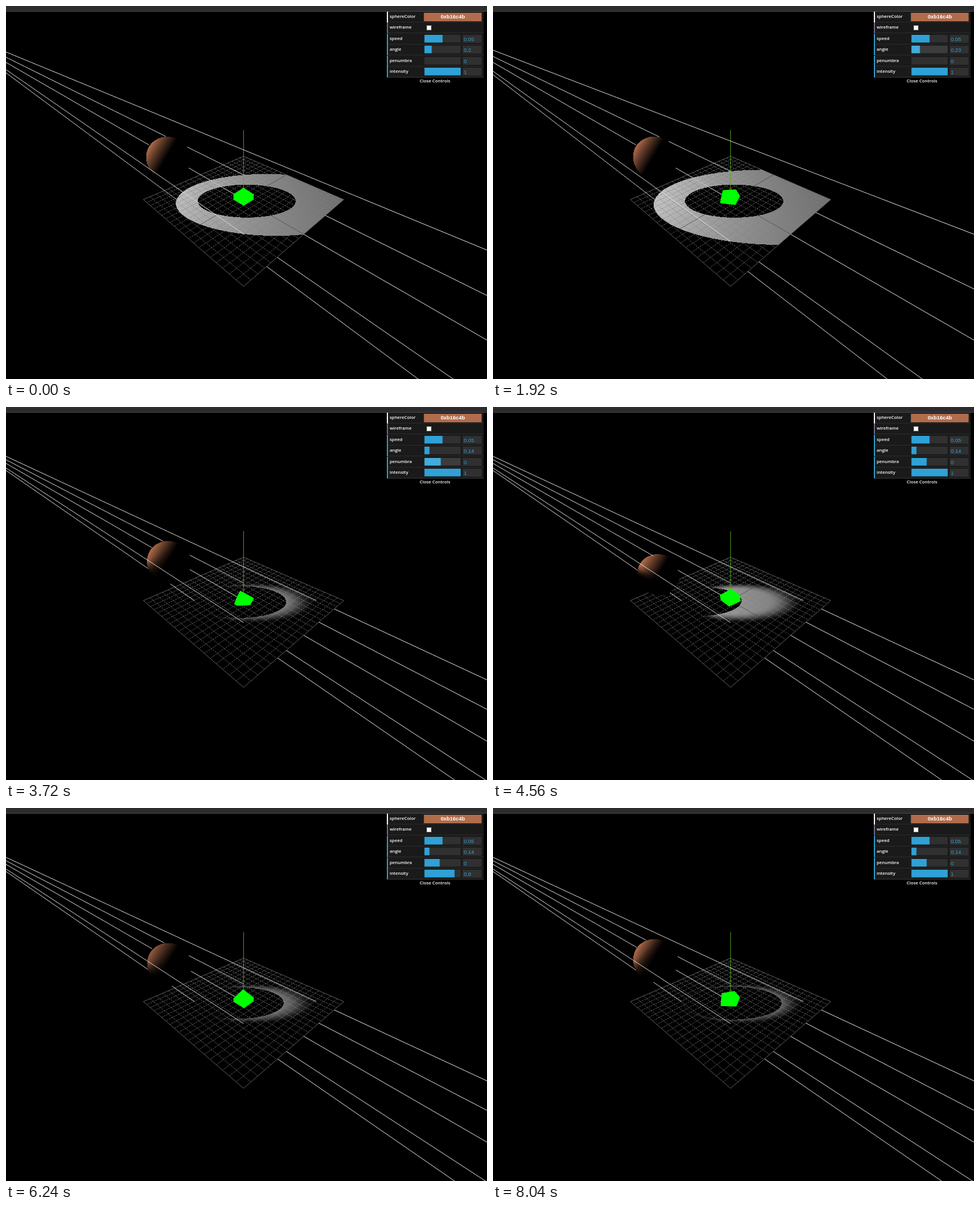
Recreate the animation shown at these times as an HTML page with a canvas. Size 850 px wide and 659 px high, loop 8.1 s.

```html
<!DOCTYPE html>
<html lang="en">
<head>
<meta charset="utf-8">
<title>Spotlight scene</title>
<style>
html, body { margin: 0; width: 100%; height: 100%; overflow: hidden; background: #000; }
canvas { display: block; }
</style>
</head>
<body>
<canvas id="stage" width="850" height="659"></canvas>
<script>
const ctx = document.getElementById('stage').getContext('2d');
const LOOP = 8100, TICK = 60;

// Vectors
const add = (a, b, k = 1) => [a[0] + b[0] * k, a[1] + b[1] * k, a[2] + b[2] * k];
const dot = (a, b) => a[0] * b[0] + a[1] * b[1] + a[2] * b[2];
const unit = a => add([0, 0, 0], a, 1 / Math.hypot(...a));

// Camera at (30, 30, 30) looking at the origin
const EYE = [30, 30, 30], FOCAL = 433.6, CX = 419.8, CY = 342;
const RIGHT = unit([1, 0, -1]), UP = unit([-1, 2, -1]), FORWARD = unit([-1, -1, -1]);
function project(p) {
  const q = add(p, EYE, -1), k = FOCAL / dot(q, FORWARD);
  return [CX + dot(q, RIGHT) * k, CY - dot(q, UP) * k];
}

// Scene
const LAMP = [-30, 30, 30], AXIS = unit([1, -1, -1]);
const SIDE = unit([-1, 0, -1]), TILT = unit([1, 2, -1]);
const HALF = 15, RADIUS = 4, BALL_COLOR = [177, 108, 75], BEAM_COLOR = '#e8e8e8';
const VIEW = { x: 240, y: 222, w: 360, h: 278 };

function makeLayer() {
  const canvas = document.createElement('canvas');
  canvas.width = VIEW.w;
  canvas.height = VIEW.h;
  const c = canvas.getContext('2d');
  return { canvas, c, img: c.createImageData(VIEW.w, VIEW.h) };
}
const floorLayer = makeLayer(), ballLayer = makeLayer();

// Piecewise linear value over time
function track(t, keys) {
  let [t0, v0] = keys[0];
  for (const [t1, v1] of keys) {
    if (t < t1) return v0 + (v1 - v0) * Math.max(0, (t - t0) / (t1 - t0 || 1));
    [t0, v0] = [t1, v1];
  }
  return v0;
}

function stateAt(n) {
  const t = n * TICK;
  const within = (a, b) => t >= a && t < b;
  return {
    ball: [-10, 10 * Math.abs(Math.cos(0.0986 * n - 0.31)), 10],
    spin: 0.0625 * n - 1.47,
    angle: track(t, [[1020, 0.2], [1500, 0.26], [1920, 0.234], [2760, 0.137]]),
    penumbra: track(t, [[3060, 0], [3540, 0.45], [3780, 0.45], [4140, 0.42]]),
    intensity: track(t, [[6000, 1], [6540, 0.62], [7200, 0.62], [7500, 1]]),
    hover: within(480, 720) ? 'speed'
      : within(720, 2820) ? 'angle'
      : within(2940, 4500) || within(5520, 5700) ? 'penumbra'
      : within(5700, 6180) ? 'intensity' : ''
  };
}

// First distance along d at which the ray enters the ball
function hitBall(o, d, ball) {
  const m = add(o, ball, -1), a = dot(d, d), b = dot(m, d);
  const disc = b * b - a * (dot(m, m) - RADIUS * RADIUS);
  return disc < 0 ? Infinity : (-b - Math.sqrt(disc)) / a;
}

function light(p, normal, s) {
  const l = unit(add(LAMP, p, -1));
  const edge = Math.cos(s.angle), full = Math.cos(s.angle * (1 - s.penumbra));
  const k = Math.min(1, Math.max(0, (-dot(l, AXIS) - edge) / (full - edge || 1e-9)));
  return Math.max(0, dot(normal, l)) * k * k * (3 - 2 * k) * s.intensity;
}

function shade(s) {
  const floor = floorLayer.img.data, ball = ballLayer.img.data;
  floor.fill(0);
  ball.fill(0);
  for (let y = 0, i = 0; y < VIEW.h; y++) {
    for (let x = 0; x < VIEW.w; x++, i += 4) {
      const dx = (VIEW.x + x + 0.5 - CX) / FOCAL, dy = (CY - VIEW.y - y - 0.5) / FOCAL;
      const d = add(add(FORWARD, RIGHT, dx), UP, dy);
      const tFloor = -EYE[1] / d[1], tBall = hitBall(EYE, d, s.ball);
      const p = add(EYE, d, tFloor);
      const onFloor = tFloor > 0 && Math.abs(p[0]) <= HALF && Math.abs(p[2]) <= HALF;
      if (tBall < Infinity && !(onFloor && tFloor < tBall)) {
        const q = add(EYE, d, tBall);
        const b = light(q, unit(add(q, s.ball, -1)), s);
        BALL_COLOR.forEach((c, j) => { ball[i + j] = c * b * 1.03; });
        ball[i + 3] = 255;
      }
      if (onFloor) {
        let b = light(p, [0, 1, 0], s);
        if (b) {
          const t = hitBall(p, add(LAMP, p, -1), s.ball);
          if (t < 1 && t > -0.3) b = 0;
        }
        floor[i] = floor[i + 1] = floor[i + 2] = 255 * b * 1.02;
        floor[i + 3] = 255;
      }
    }
  }
  for (const layer of [floorLayer, ballLayer]) layer.c.putImageData(layer.img, 0, 0);
}

function strokeLine(a, b, color) {
  ctx.strokeStyle = color;
  ctx.beginPath();
  ctx.moveTo(...project(a));
  ctx.lineTo(...project(b));
  ctx.stroke();
}

function drawGrid() {
  for (let i = 0; i <= 20; i++) {
    const k = -HALF + i * 1.5, border = i % 20 === 0;
    const color = border ? '#6a6a6a' : i === 10 ? '#444' : '#808080';
    ctx.setLineDash(border || i === 10 ? [] : [3, 1.5]);
    ctx.lineWidth = border ? 0.9 : 0.75;
    strokeLine([k, 0, -HALF], [k, 0, HALF], color);
    strokeLine([-HALF, 0, k], [HALF, 0, k], color);
  }
  ctx.setLineDash([]);
  ctx.lineWidth = 1;
}

function rays(angle) {
  const k = Math.tan(angle);
  return [AXIS, add(AXIS, SIDE, k), add(AXIS, SIDE, -k), add(AXIS, TILT, k), add(AXIS, TILT, -k)];
}

// Part of a ray above the floor, broken where the ball covers it
function drawRay(dir, ball) {
  const end = -LAMP[1] / dir[1], steps = 240;
  let pen = false;
  ctx.strokeStyle = BEAM_COLOR;
  ctx.beginPath();
  for (let i = 0; i <= steps; i++) {
    const p = add(LAMP, dir, end * i / steps);
    const t = hitBall(EYE, add(p, EYE, -1), ball);
    const hidden = t > 0 && t < 1;
    if (!hidden) ctx[pen ? 'lineTo' : 'moveTo'](...project(p));
    pen = !hidden;
  }
  ctx.stroke();
}

function hull(points) {
  const half = list => {
    const out = [];
    for (const p of list) {
      for (;;) {
        const [a, b] = out.slice(-2);
        if (!b || (b[0] - a[0]) * (p[1] - a[1]) > (b[1] - a[1]) * (p[0] - a[0])) break;
        out.pop();
      }
      out.push(p);
    }
    return out.slice(0, -1);
  };
  points.sort((a, b) => a[0] - b[0] || a[1] - b[1]);
  return [...half(points), ...half([...points].reverse())];
}

// Silhouette of the part of the cube above the floor
function drawCube(spin) {
  const c = Math.cos(spin), s = Math.sin(spin);
  const axes = [[c, s * s, -s * c], [0, c, s], [s, -c * s, c * c]];
  const corners = [...Array(8).keys()].map(i =>
    axes.reduce((p, a, j) => add(p, a, i >> j & 1 ? 1.5 : -1.5), [0, 0, 0]));
  const shown = corners.filter(p => p[1] >= 0);
  corners.forEach((p, i) => [1, 2, 4].forEach(bit => {
    const q = corners[i ^ bit];
    if (p[1] >= 0 && q[1] < 0) shown.push(add(p, add(q, p, -1), p[1] / (p[1] - q[1])));
  }));
  ctx.fillStyle = '#0f0';
  ctx.beginPath();
  hull(shown.map(project)).forEach(p => ctx.lineTo(...p));
  ctx.fill();
}

function rect(x, y, w, h, color) {
  ctx.fillStyle = color;
  ctx.fillRect(x, y, w, h);
}

function text(str, x, y, color, font, align = 'left') {
  ctx.font = font;
  ctx.textAlign = align;
  ctx.textBaseline = 'middle';
  ctx.fillStyle = color;
  ctx.fillText(str, x, y);
}

const LABEL = '600 7.8px "Open Sans", sans-serif';
const DIGITS = '9.4px "Liberation Sans", Arial, sans-serif';

function drawPanel(s) {
  rect(0, 0, 850, 9, '#2c2c2c');
  rect(0, 9, 850, 1, '#484848');
  const rows = [
    ['sphereColor', '#fff'],
    ['wireframe', '#806787'],
    ['speed', '#2fa1d6', 0.5, '0.05'],
    ['angle', '#2fa1d6', s.angle, +s.angle.toFixed(2)],
    ['penumbra', '#2fa1d6', s.penumbra, 0],
    ['intensity', '#2fa1d6', s.intensity, +s.intensity.toFixed(1)]
  ];
  rows.forEach(([name, edge, value, shown], i) => {
    const y = 10 + Math.floor(i * 19.5), over = s.hover === name;
    rect(673, y, 171, 20, '#1a1a1a');
    rect(673, y + 18, 171, 1, '#2c2c2c');
    rect(673, y, 2, 19, edge);
    text(name, 678, y + 8.8, '#fff', LABEL);
    if (value === undefined) return;
    rect(739.5, y + 2, 64, 13.5, over ? '#3c3c3c' : '#303030');
    rect(739.5, y + 2, 64 * value, 13.5, over ? '#44abda' : '#2fa1d6');
    rect(807, y + 2, 33.5, 14, '#303030');
    text(shown, 809, y + 10.3, '#2fa1d6', DIGITS);
  });
  rect(738.5, 12, 102, 15, '#b16c4b');
  text('0xb16c4b', 789.5, 19.5, '#fff', 'bold ' + DIGITS, 'center');
  rect(743, 34, 9, 9, '#777');
  rect(744, 35, 7, 7, '#fff');
  text('Close Controls', 758, 133, '#fff', LABEL, 'center');
}

function draw(s) {
  shade(s);
  rect(0, 0, 850, 659, '#000');
  ctx.lineWidth = 1;
  const beams = rays(s.angle);
  for (const dir of beams) {
    strokeLine(add(LAMP, dir, -LAMP[1] / dir[1]), add(LAMP, dir, 1000), BEAM_COLOR);
  }
  ctx.drawImage(floorLayer.canvas, VIEW.x, VIEW.y);
  drawGrid();
  ctx.drawImage(ballLayer.canvas, VIEW.x, VIEW.y);
  strokeLine([0, 0, 0], [0, 15, 0], '#5aa822');
  for (const dir of beams) drawRay(dir, s.ball);
  drawCube(s.spin);
  drawPanel(s);
}

let last = -1;
function frame() {
  const n = Math.floor(performance.now() % LOOP / TICK);
  if (n !== last) draw(stateAt(last = n));
  requestAnimationFrame(frame);
}
frame();
</script>
</body>
</html>
```
